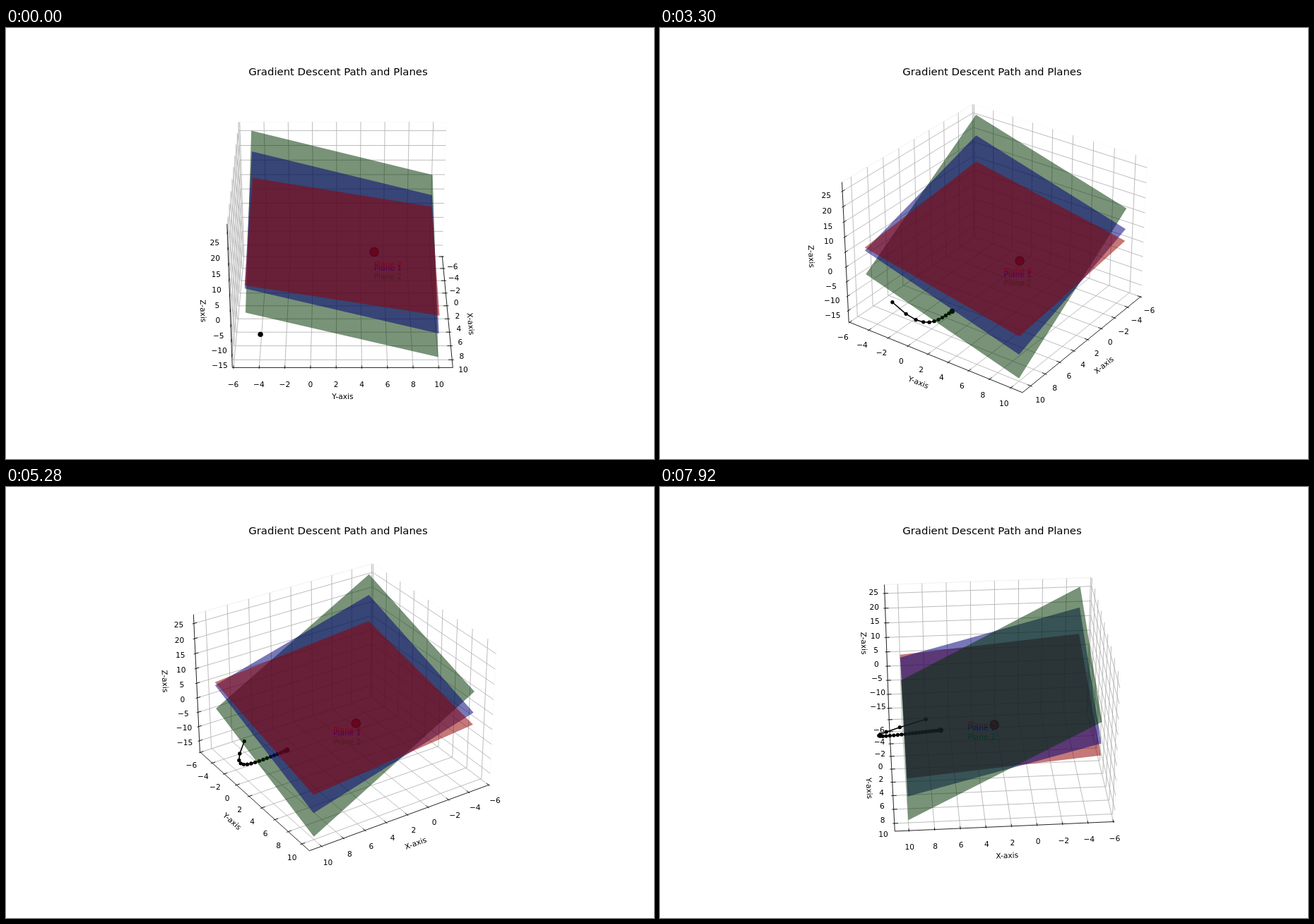
An HTML page with a canvas that plays this animation: 917x611 px, repeating every 8 s.

```html
<!DOCTYPE html>
<html lang="en">
<head>
<meta charset="utf-8">
<title>Gradient Descent Path and Planes</title>
<style>
  html, body { margin: 0; width: 100%; height: 100%; overflow: hidden; background: #fff; }
  canvas { display: block; width: 917px; height: 611px; }
</style>
</head>
<body>
<canvas id="stage" width="917" height="611"></canvas>
<script>
const ctx = document.getElementById('stage').getContext('2d');

// The figure is laid out on a 1200 x 800 sheet and scaled to the stage.
const SHEET = [1200, 800];
const PT = 100 / 72;
const FONT = '"DejaVu Sans", sans-serif';
const LOOP = 8000, STEP = 330;
const ITERATIONS = 100, RATE = 0.02;

// Axis limits and box size, in the order x, y, z
const LO = [-6.09375, -6.09375, -18.9375];
const HI = [11.09375, 11.09375, 27.9375];
const BOX = [1.1904, 1.1904, 0.8928];
const RANGE = HI.map((hi, i) => hi - LO[i]);
const MID = HI.map((hi, i) => (hi + LO[i]) / 2);

const range = (from, to, by) =>
  Array.from({ length: Math.round((to - from) / by) + 1 }, (_, i) => from + i * by);
const TICKS = [range(-6, 10, 2), range(-6, 10, 2), range(-15, 25, 5)];
const AXIS_NAMES = ['X-axis', 'Y-axis', 'Z-axis'];

// Planes: normal . p = d
const planes = [
  { name: 'Plane 1', normal: [1, 1, 1], d: 10, fill: 'rgba(0,0,119,.53)', ink: 'blue' },
  { name: 'Plane 2', normal: [2, 1, 1], d: 12, fill: 'rgba(0,51,0,.53)', ink: 'green' },
  { name: 'Plane 3', normal: [1, 2, 3], d: 18, fill: 'rgba(145,0,0,.53)', ink: 'red' }
];
const onPlane = ({ normal: [a, b, c], d }, x, y) => [x, y, (d - a * x - b * y) / c];
for (const plane of planes) {
  plane.corners = [[-5, -5], [10, -5], [10, 10], [-5, 10]].map(([x, y]) => onPlane(plane, x, y));
}

// Gradient descent on the squared residuals of the three planes
const path = [[8, -4, -15]];
for (let i = 0; i < ITERATIONS; i++) {
  const p = path[i], next = [...p];
  for (const { normal, d } of planes) {
    const residual = normal.reduce((sum, n, k) => sum + n * p[k], -d);
    normal.forEach((n, k) => next[k] -= RATE * n * residual);
  }
  path.push(next);
}

const ELEV = Math.PI / 6;
let azim = 0;

function toView(p) {
  const [x, y, z] = p.map((v, i) => (v - MID[i]) / RANGE[i] * BOX[i]);
  const forward = x * Math.cos(azim) + y * Math.sin(azim);
  return {
    right: y * Math.cos(azim) - x * Math.sin(azim),
    up: z * Math.cos(ELEV) - forward * Math.sin(ELEV),
    depth: forward * Math.cos(ELEV) + z * Math.sin(ELEV)
  };
}

function project(p) {
  const { right, up, depth } = toView(p);
  const scale = 616 / 0.185 / (10 - depth);
  return [623.3 + right * scale, 395.7 - up * scale];
}

function trace(points) {
  ctx.beginPath();
  points.forEach(p => ctx.lineTo(...project(p)));
}

function line(points, color, width) {
  trace(points);
  ctx.strokeStyle = color;
  ctx.lineWidth = width * PT;
  ctx.stroke();
}

function dot(p, radius, color) {
  ctx.beginPath();
  ctx.arc(...project(p), radius * PT, 0, 2 * Math.PI);
  ctx.fillStyle = color;
  ctx.fill();
}

function text(string, x, y, { size = 10, color = '#000', align = 'center', angle = 0, drop = 0 } = {}) {
  ctx.save();
  ctx.translate(x, y);
  ctx.rotate(angle);
  ctx.font = `${size * PT}px ${FONT}`;
  ctx.textAlign = align;
  ctx.fillStyle = color;
  ctx.fillText(string, 0, drop * size * PT);
  ctx.restore();
}

// Point on the visible edge of an axis, pushed outwards by a share of the range
function edgePoint(axis, value, push = 0) {
  const base = axis === 0 ? [0, HI[1], LO[2]] : axis === 1 ? [HI[0], 0, LO[2]] : [HI[0], LO[1], 0];
  return base.map((v, i) => i === axis ? value : v + Math.sign(v - MID[i]) * push * RANGE[i]);
}

function drawPanes() {
  const [x0, y0, z0] = LO, [x1, y1, z1] = HI;
  const pane = (points, color) => line([...points, points[0]], color, 0.8);
  pane([[x0, y0, z0], [x0, y1, z0], [x0, y1, z1], [x0, y0, z1]], '#f9f9f9');
  pane([[x0, y0, z0], [x1, y0, z0], [x1, y0, z1], [x0, y0, z1]], '#eeeeee');
  pane([[x0, y0, z0], [x1, y0, z0], [x1, y1, z0], [x0, y1, z0]], '#f6f6f6');
}

function drawGrid(axis) {
  const [x0, y0, z0] = LO, [x1, y1, z1] = HI;
  for (const v of TICKS[axis]) {
    line([
      [[v, y1, z0], [v, y0, z0], [v, y0, z1]],
      [[x1, v, z0], [x0, v, z0], [x0, v, z1]],
      [[x1, y0, v], [x0, y0, v], [x0, y1, v]]
    ][axis], '#b0b0b0', 0.8);
  }
}

function drawAxis(axis) {
  const ends = [edgePoint(axis, LO[axis]), edgePoint(axis, HI[axis])];
  line(ends, '#000', 0.8);

  const tickDirection = axis === 0 ? 1 : 0;
  for (const v of TICKS[axis]) {
    const tick = offset => {
      const p = edgePoint(axis, v);
      p[tickDirection] += offset * RANGE[tickDirection] / 12;
      return p;
    };
    line([tick(0.1), tick(-0.2)], '#000', 0.8);
    text(String(v).replace('-', '\u2212'), ...project(edgePoint(axis, v, 0.0519)), { drop: 0.76 });
  }

  const [[ax, ay], [bx, by]] = ends.map(project);
  let angle = Math.atan((by - ay) / (bx - ax));
  text(AXIS_NAMES[axis], ...project(edgePoint(axis, MID[axis], 0.1128)), { angle, drop: 0.275 });
}

function drawPath(count) {
  const done = path.slice(0, count);
  line(done, '#000', 1.5);
  done.forEach(p => dot(p, 2.5, '#000'));
  dot(path[count], 3.5, '#000');

  const last = path[ITERATIONS];
  dot(last, 6.4, '#000');
  dot(last, 5.5, 'red');
}

function drawPlanes() {
  const nearest = plane => Math.max(...plane.corners.map(p => toView(p).depth));
  const sorted = [...planes].sort((a, b) => nearest(a) - nearest(b));
  sorted.forEach((plane, i) => {
    trace(plane.corners);
    ctx.fillStyle = plane.fill;
    ctx.fill();
    // Labels lie between the farthest plane and the other two
    if (i === 0) {
      for (const label of planes) {
        text(label.name, ...project(onPlane(label, 5, 5)), { color: label.ink, align: 'left' });
      }
    }
  });
}

function draw(now) {
  const step = Math.floor(now % LOOP / STEP);
  azim = step * 2 * Math.PI / path.length;

  ctx.setTransform(917 / SHEET[0], 0, 0, 611 / SHEET[1], 0, 0);
  ctx.fillStyle = '#fff';
  ctx.fillRect(0, 0, ...SHEET);
  ctx.lineJoin = 'round';

  drawPanes();
  [0, 1, 2].forEach(drawGrid);
  [0, 1, 2].forEach(drawAxis);
  drawPath(step);
  drawPlanes();
  text('Gradient Descent Path and Planes', 615, 87.7, { size: 14 });
}

const start = performance.now();
function loop() {
  draw(performance.now() - start);
  requestAnimationFrame(loop);
}
loop();
</script>
</body>
</html>
```
